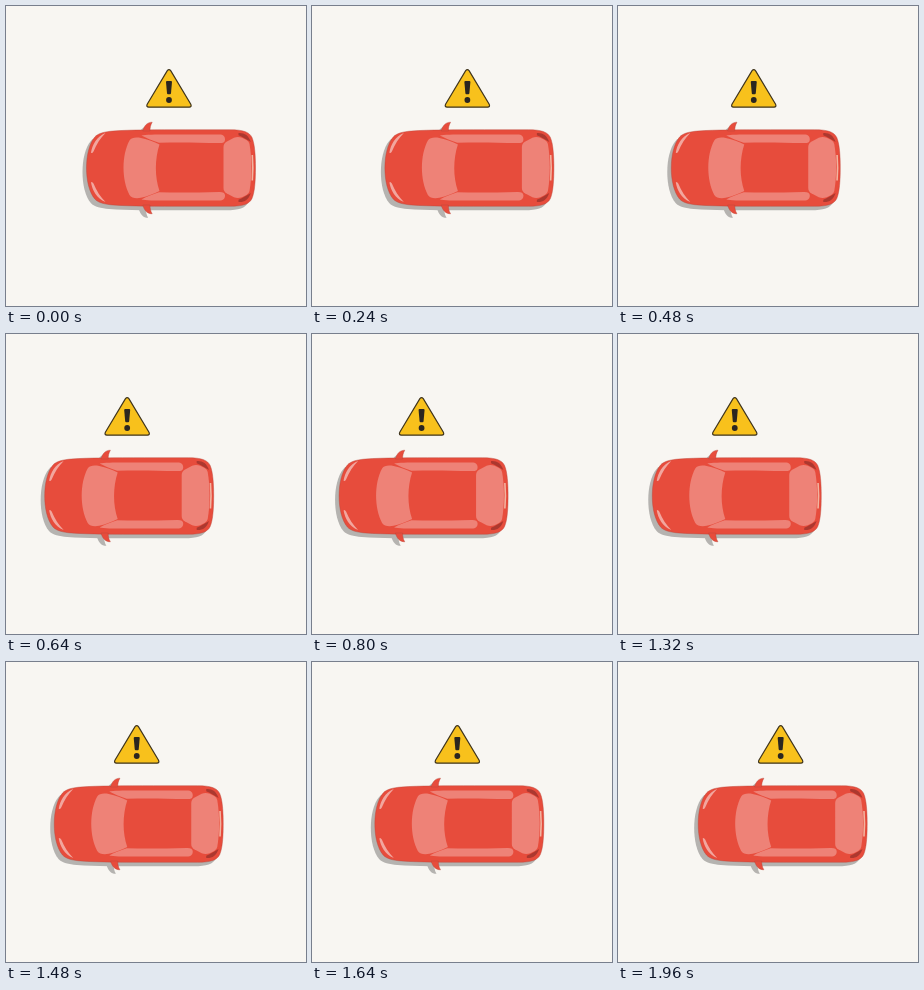
An HTML page for the animation above (2000 ms loop, 300 by 300 pixels).

```html
<!DOCTYPE html>
<html lang="en">
<head>
<meta charset="utf-8">
<title>Car warning</title>
<style>
html, body { margin: 0; width: 100%; height: 100%; overflow: hidden; background: #f8f6f2; }
svg { display: block; width: 100vw; height: 100vh; }
</style>
</head>
<body>
<svg viewBox="0 0 300 300">
  <defs>
    <g id="shell">
      <path d="M80.500 162C80.500 150 83 138 88.800 131C92.500 127 99 125.700 107 125C125 123.700 150 123.700 180 123.700H224C237 123.700 243.500 126 246 131.500C248.800 138 249.500 150 249.500 162C249.500 174 248.800 186 246 192.500C243.500 198 237 200.300 224 200.300H180C150 200.300 125 200.300 107 199C99 198.300 92.500 197 88.800 193C83 186 80.500 174 80.500 162Z"/>
      <path id="mirror" d="M136.800 125C138.200 119.800 141 116.200 146.200 116.200C144.500 119 144 122 144 125Z"/>
      <use href="#mirror" transform="matrix(1 0 0 -1 0 324)"/>
    </g>
    <g id="side">
      <path fill="#ee8277" d="M135.500 129.500C139 128.500 150 128.500 160 128.500H213C217.500 128.500 219.300 130.500 219 134C218.700 136.500 217 137.200 213 137.100C190 136.300 170 136.200 153 136.700C146 134.500 140 132 135.500 129.500Z"/>
      <path fill="#ac382f" d="M232.500 127C238 126.500 242.500 129 244.800 136C241 133.500 237 131.300 232.500 129.300Z"/>
      <path fill="#f2a69e" d="M85 146.500C86.300 139 90.500 130.500 99.500 127C94.500 132 90.500 138 87.500 145.500Q86 148 85 146.500Z"/>
    </g>
  </defs>
  <g id="scene">
    <use href="#shell" x="-4" y="4" fill="#b5b3b0"/>
    <use href="#shell" fill="#e74c3c" stroke="#b84538" stroke-opacity=".6" stroke-width=".7"/>
    <path fill="#ee8277" d="M123.500 134.500C125.500 131.500 130 131 135 132C142 133.500 148 135.500 153.500 138.500C148.700 153 148.700 171 153.500 185C148 188 142 190 135 191.800C130 192.900 125.500 192 123.500 189C115.500 174 115.500 149 123.500 134.500Z"/>
    <path fill="#ee8277" d="M217.500 141Q217.500 137.500 220.500 135.700L228 131.700Q232 130.300 236 131.800L240.500 134Q243 135.500 243.500 138C246 152 246 171 243.500 185Q243 187.500 240.500 189L236 191.200Q232 192.700 228 191.300L220.500 187.300Q217.500 185.500 217.500 182Z"/>
    <use href="#side"/>
    <use href="#side" transform="matrix(1 0 0 -1 0 323)"/>
    <path fill="none" stroke="#f2b3a0" stroke-width="1.600" d="M246.300 149C247 157 247 166 246.300 174.500"/>
    <path fill="#f8c11c" stroke="#3f341c" stroke-width="1.200" d="M161.300 64.700Q163 62.600 164.700 64.700L184.800 98.300Q186 101 183.200 101.200H142.800Q140 101 141.200 98.300Z"/>
    <path fill="#2b2620" d="M160 76Q160 75 161 75H165Q166 75 166 76L165 87.200Q164.900 88.200 164 88.200H162Q161.100 88.200 161 87.200Z"/>
    <circle cx="163" cy="94" r="2.900" fill="#2b2620"/>
  </g>
</svg>
<script>
const scene = document.getElementById('scene');
const LOOP = 2000, STEP = 40, LAG = 7, TRAVEL = 59.5;

function draw(now) {
  const t = Math.floor((now + 1) / STEP) * STEP % LOOP;
  const x = -TRAVEL * (1 - Math.cos(2 * Math.PI * (t - LAG) / LOOP)) / 2;
  scene.setAttribute('transform', `translate(${x} 0)`);
  requestAnimationFrame(draw);
}
draw(0);
</script>
</body>
</html>
```
